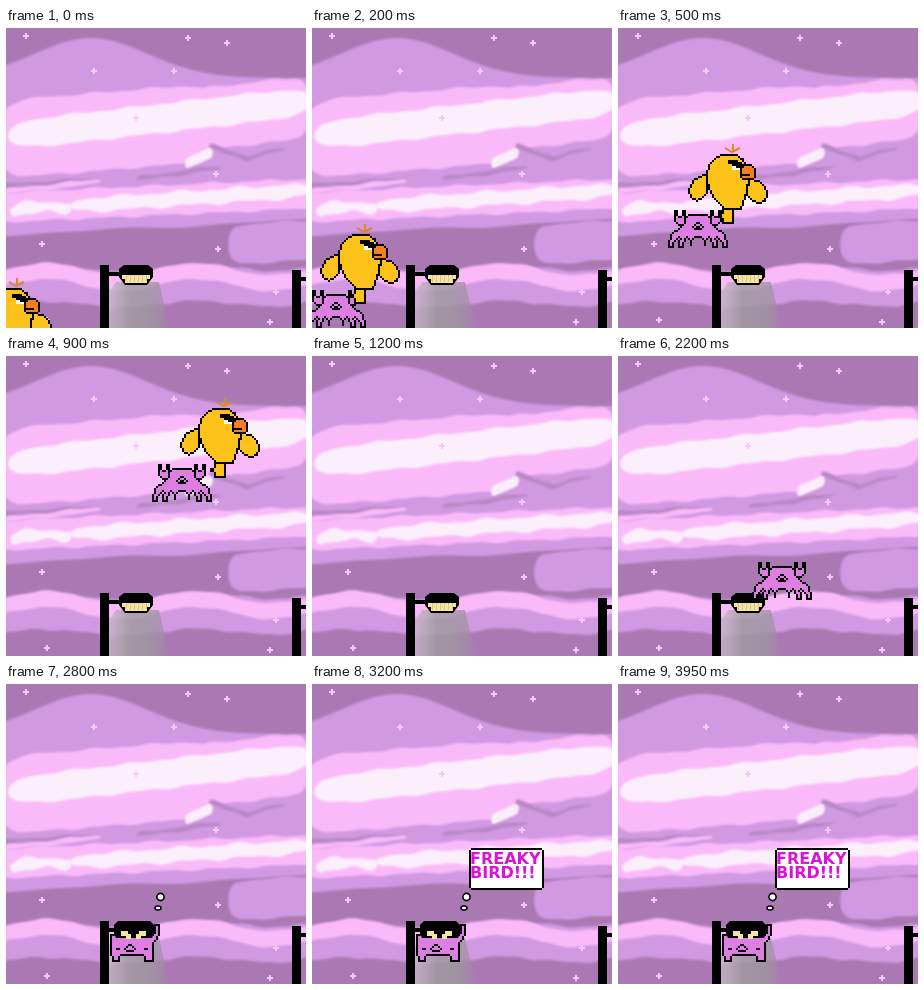
An HTML page with a canvas for the animation above (4.2 s loop, 300 by 300 pixels).

```html
<!DOCTYPE html>
<html lang="en">
<head>
<meta charset="utf-8">
<style>
html, body { margin: 0; width: 100%; height: 100%; overflow: hidden; background: #aa79b3; }
canvas { display: block; width: 300px; height: 300px; }
</style>
</head>
<body>
<canvas id="stage" width="300" height="300"></canvas>
<script>
const ctx = document.getElementById('stage').getContext('2d');
const LOOP = 4200;
const PINK = '#df7ee2', YELLOW = '#fdc31b', ORANGE = '#f5801f', CREAM = '#f3e5a2', BLACK = '#000';

const mix = (a, b, k) => a + (b - a) * k;

function layer(w, h, draw) {
  const c = document.createElement('canvas');
  c.width = w;
  c.height = h;
  draw(c.getContext('2d'));
  return c;
}

function box(g, color, x, y, w, h) {
  g.fillStyle = color;
  g.fillRect(x, y, w, h);
}

// Fills the area between two edges given as functions of x.
function area(g, color, x0, x1, top, bottom) {
  g.beginPath();
  for (let x = x0; x <= x1; x++) g.lineTo(x, top(x));
  for (let x = x1; x >= x0; x--) g.lineTo(x, bottom(x));
  g.fillStyle = color;
  g.fill();
}

const ripple = (x, seed) => Math.sin(x / 9 + seed) + 0.6 * Math.sin(x / 4.7 + 2 * seed);
const swell = x => -6 * Math.cos((x - 40) * Math.PI / 75);

// A slanted cloud with rounded ends and rippled edges.
function band(g, color, x0, x1, y0, y1, thick, bump = 0.8, wave = () => 0) {
  const edge = side => x => {
    const k = (x - x0) / (x1 - x0);
    const taper = Math.sqrt(1 - Math.abs(2 * k - 1) ** 10);
    return mix(y0, y1, k) + wave(x) + side * taper * (thick / 2 + bump * ripple(x, y0 + side));
  };
  area(g, color, x0, x1, edge(-1), edge(1));
}

// Fills a path on a 2px grid, with a black rim; `mirror` adds its reflection about that x.
function pixels(g, d, fill, mirror) {
  const path = new Path2D(d);
  if (mirror) path.addPath(new Path2D(d), new DOMMatrix([-1, 0, 0, 1, 2 * mirror, 0]));
  const inside = (x, y) => g.isPointInPath(path, x + 1, y + 1);
  for (let y = 0; y < 84; y += 2) for (let x = 0; x < 84; x += 2) {
    if (!inside(x, y)) continue;
    const core = inside(x - 2, y) && inside(x + 2, y) && inside(x, y - 2) && inside(x, y + 2);
    box(g, core ? fill : BLACK, x, y, 2, 2);
  }
}

const sky = layer(300, 300, g => {
  const mid = '#d199e1', pink = '#fabafa', white = '#fbeffc', dusk = '#b887c4';
  box(g, '#aa79b3', 0, 0, 300, 300);
  g.filter = 'blur(1.3px)';
  area(g, mid, -10, 310,
    x => 50 - 40 * Math.exp(-(((x - 85) / 80) ** 2)),
    x => 207 - x * 0.05 + ripple(x / 3, 1));
  band(g, mid, 222, 345, 217, 209, 40);
  band(g, mid, -40, 340, 259, 257, 36, 0.8, x => swell(x) / 2);

  band(g, pink, -10, 212, 112, 94, 78);
  band(g, pink, 180, 304, 93, 79, 62);
  band(g, white, 2, 306, 108, 73, 29);
  band(g, white, 179, 207, 136, 124, 11, 0);
  band(g, dusk, 203, 243, 118, 131, 5);
  band(g, dusk, 238, 280, 131, 120, 3);

  band(g, dusk, 130, 216, 151, 139, 4);
  band(g, dusk, -20, 90, 159, 152, 4);
  band(g, pink, -10, 95, 165, 153, 5);
  band(g, pink, -40, 340, 181, 164, 30);
  band(g, white, 4, 66, 182, 178, 11, 2.2);
  band(g, white, 64, 306, 178, 162, 14, 1.2);
  band(g, pink, -40, 340, 249, 249, 16, 0.6, swell);
  g.filter = 'none';

  const stars = [[20, 8], [182, 10], [221, 15], [88, 43], [168, 43], [130, 90],
    [210, 146], [36, 216], [212, 221], [270, 264], [41, 292], [264, 294]];
  for (const [x, y] of stars) {
    box(g, '#f5c9f5', x - 3, y - 1, 6, 2);
    box(g, '#f5c9f5', x - 1, y - 3, 2, 6);
  }

  const light = g.createLinearGradient(103, 0, 164, 0);
  light.addColorStop(0, 'rgba(200,185,200,.75)');
  light.addColorStop(0.35, 'rgba(160,155,160,.85)');
  light.addColorStop(0.75, 'rgba(160,150,162,.8)');
  light.addColorStop(1, 'rgba(165,130,172,.5)');
  g.fillStyle = light;
  g.fill(new Path2D('M110 254H153L164 300H103V264Z'));

  for (const [x, y, arm] of [[94, 237, 12], [286, 242, 5]]) {
    box(g, BLACK, x, y, 9, 63);
    box(g, BLACK, x + 9, y + 7, arm, 4);
  }
  g.fill(new Path2D('M118 237H142L147 241V249L141 257H119L113 249V241Z'));
  box(g, CREAM, 116, 247, 28, 4);
  box(g, CREAM, 119, 251, 22, 4);
  for (let x = 120; x < 143; x += 4) box(g, '#d8c583', x, 247, 1, 7);
});

const crab = layer(60, 38, g => {
  pixels(g, 'M30 5H40Q48 10 47 18Q59 20 60 37H54Q53 29 47 27Q51 31 50 37H44Q44 30 40 28L37 35L34 28H30Z', PINK, 30);
  pixels(g, 'M6 0H10V6H14V0H18V12L14 16H10L6 10Z', PINK, 30);
  pixels(g, 'M24 17L30 12L36 17L30 21Z', PINK);
  box(g, BLACK, 28, 16, 4, 2);
});

const bird = layer(84, 84, g => {
  pixels(g, 'M34 62H46V80H34V74H30V70H34Z', YELLOW);
  pixels(g, 'M20 30Q4 32 0 46Q2 58 10 57Q18 54 20 48Z', YELLOW);
  pixels(g, 'M60 34Q74 34 80 48Q80 60 70 60Q62 58 58 50Z', YELLOW);
  pixels(g, 'M30 12Q40 7 50 11Q62 18 62 36Q58 56 54 65H36Q18 50 18 32Q20 16 30 12Z', YELLOW);
  box(g, '#fff', 44, 20, 10, 6);
  pixels(g, 'M40 16H48L56 20V24H50L40 19Z', BLACK);
  pixels(g, 'M54 20H64L68 25V32L64 36H54L51 30Z', ORANGE);
  box(g, BLACK, 52, 30, 10, 2);
  g.strokeStyle = '#d88928';
  g.lineWidth = 2;
  g.stroke(new Path2D('M37 4L44 8L52 4M45 0V8'));
});

// The crab with the lamp on its head.
const wearer = layer(84, 84, g => {
  pixels(g, 'M4 14H46V4H52V14L46 24V42H36V36H12V42H4L2 28V16Z', PINK);
  g.fill(new Path2D('M10 1H42L46 5V13L44 18H8L6 13V5Z'));
  for (const [x, inner] of [[13, 18], [31, 28]]) {
    box(g, CREAM, x, 11, 7, 5);
    box(g, CREAM, inner, 14, 5, 5);
  }
  pixels(g, 'M16 29L22 24L28 29L22 33Z', PINK);
  box(g, BLACK, 8, 28, 4, 2);
  box(g, BLACK, 36, 28, 4, 2);
});

function carry(t) {
  const keys = [[0, -34, 250], [500, 70, 116], [900, 174, 42], [1200, 197, -115]];
  const i = keys.findIndex(key => key[0] > t);
  const [t0, x0, y0] = keys[i - 1], [t1, x1, y1] = keys[i];
  const k = (t - t0) / (t1 - t0);
  const x = Math.round(mix(x0, x1, k)), y = Math.round(mix(y0, y1, k));
  const lag = Math.round(Math.min(28, 10 + t / 50));
  ctx.drawImage(crab, x - lag, y + 66);
  ctx.drawImage(bird, x, y);
}

function fall(t) {
  const k = (t - 1700) / 500;
  ctx.drawImage(crab, Math.round(mix(169, 134, k)), Math.round(mix(14, 206, k)));
}

function puff(x, y, rx, ry) {
  ctx.beginPath();
  ctx.ellipse(x, y, rx, ry, 0, 0, 7);
  ctx.fillStyle = '#fff';
  ctx.fill();
  ctx.strokeStyle = BLACK;
  ctx.lineWidth = 1.6;
  ctx.stroke();
}

function speech(t) {
  if (t >= 2600) puff(152, 224, 3, 2);
  if (t >= 2800) puff(154.5, 213, 3.6, 3.6);
  if (t < 3000) return;
  box(ctx, BLACK, 159, 164, 71, 42);
  box(ctx, BLACK, 157, 166, 75, 38);
  box(ctx, '#fff', 159, 166, 71, 38);
  if (t < 3200) return;
  ctx.font = 'bold 16px "DejaVu Sans", sans-serif';
  ctx.fillStyle = '#dc12dc';
  ctx.fillText('FREAKY', 158, 180);
  ctx.fillText('BIRD!!!', 158, 194);
}

function frame() {
  const t = Math.floor(performance.now() % LOOP / 100) * 100;
  ctx.drawImage(sky, 0, 0);
  if (t < 1200) carry(t);
  else if (t >= 1600 && t < 2400) fall(t);
  else if (t >= 2400) {
    ctx.drawImage(wearer, 102, 236);
    speech(t);
  }
  requestAnimationFrame(frame);
}
frame();
</script>
</body>
</html>
```
